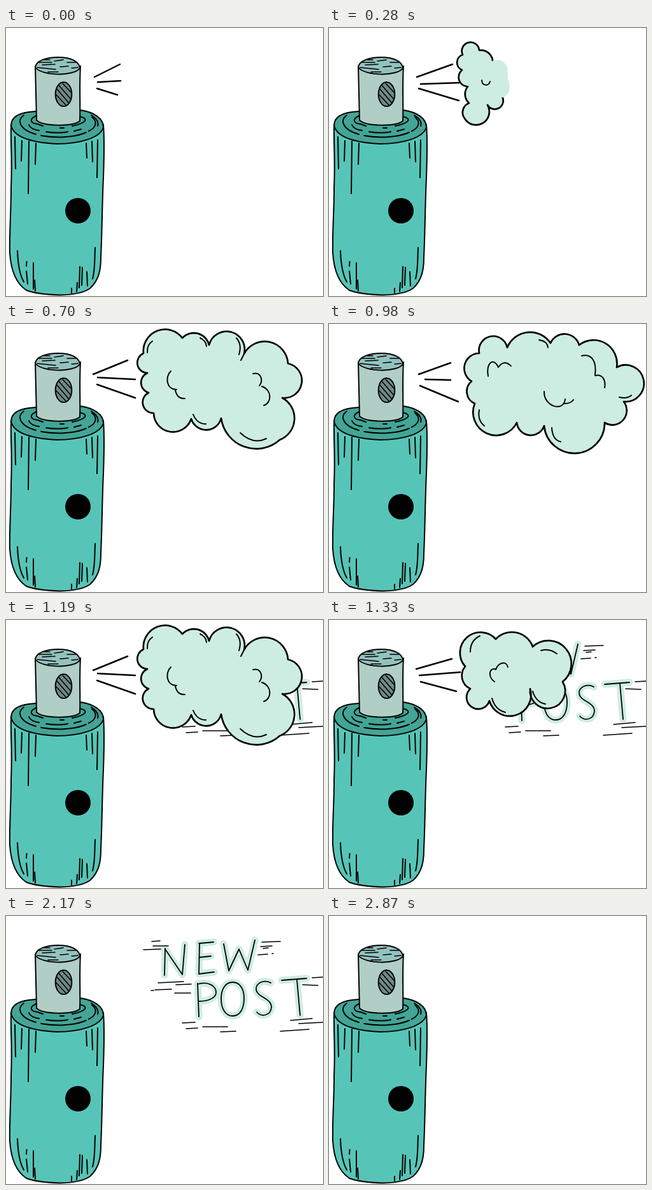
Animation, 498 px wide and 421 px high, one loop 3150 ms. Source, as an HTML page:

```html
<!DOCTYPE html>
<html lang="en">
<head>
<meta charset="utf-8">
<title>New post</title>
<style>
html, body { margin: 0; width: 100%; height: 100%; overflow: hidden; background: #fff; }
svg { display: block; width: 498px; height: 421px; }
path, ellipse { fill: none; stroke: #000; stroke-width: 2; stroke-linecap: round; stroke-linejoin: round; }
#lines path { stroke-width: 2.5; }
#text .glow { stroke: #cdece2; stroke-width: 11; }
#text .ink { stroke-width: 1.8; }
#text .dash { stroke-width: 1.7; }
#clouds .edge { fill: #cdece2; stroke-width: 2.7; }
#clouds .soft { fill: #cdece2; stroke: none; }
</style>
</head>
<body>
<svg viewBox="0 0 498 421" role="img" aria-label="Spray bottle: new post">
  <g id="bottle">
    <path fill="#56c5b7" style="fill:#56c5b7" d="M8 152C7 178 10 205 8 250C8 290 5 325 6 354C8 384 17 402 32 412C48 418 66 419 85 419.500C106 419 122 416 132 409C146 396 149 380 149 360C151 320 151 275 153 235C154 205 155 178 153 152Z"/>
    <path style="fill:#43a596" d="M8 153C8 138 24 132 47 131L117 129C138 132 153 142 153 156C148 173 115 182 80 182C42 180 12 172 8 153Z"/>
    <path d="M28 137C15 146 24 161 47 167M55 169C82 174 110 171 126 164M130 162C142 156 144 147 135 140M47 138C36 143 38 150 50 151L58 154M116 139C128 142 128 147 112 152L104 154M36 152C38 157 44 160 52 161M63 163C73 165 88 165 97 163M107 162L118 159M85 157H91M134 137C142 142 146 148 144 154"/>
    <path style="fill:#b0cec5" d="M46 60L48 145C60 155 105 155 116 146C117 120 115 90 117 60Z"/>
    <path style="fill:#94c2bf" d="M46 62C47 51 64 46 82 46C101 46 115 52 116 63C108 76 57 76 46 62Z"/>
    <path style="stroke-width:1.600" d="M51 54H72M60 50H69M76 52L90 50M96 54L110 54M49 62L78 65M85 61L98 60M57 58L77 57M103 63L113 62M66 69L82 69"/>
    <ellipse style="fill:#6e8a85" cx="90.500" cy="104" rx="12.800" ry="19"/>
    <path style="stroke-width:1.600" d="M83 90L102 112M80 96L99 118M79 105L95 122M89 87L102 101"/>
    <path d="M14 171L15 221M25 177L24 209M36 178L35 260M47 181L46 214M144 176L143 235M135 178L136 210M126 181L127 204M18 350Q19 383 28 399M32.500 367L32 374M43 369L43 410M32 382L34 402M140 345C139 365 140 380 136 394M116 375L115 408M120 376L119 404M127 383L128 405M112 400L111 414M103 409L103 416M45 396L46 413"/>
    <circle cx="113" cy="287" r="20" fill="#000"/>
  </g>
  <g id="text">
    <path class="glow"/><path class="ink"/>
    <path class="dash" d="M229 40L242 39M231 47L255 47M216 53L243 52M239 105L279 103M267 108L291 107M228 117L232 117M234 116L260 115M265 121L290 121M402 41L431 40M400 48L418 47M404 51L412 50M396 61L411 60M418 59L420 59M481 97L498 96M466 108L490 109M277 168L297 167M283 177L301 176M309 174L348 174M337 182L361 181M447 164L481 161M460 169L498 167M431 181L476 178"/>
  </g>
  <g id="lines"><path/></g>
  <g id="clouds"></g>
</svg>
<script>
const $ = q => document.querySelector(q);

const letters = 'M250 51L249 93M250 52L277 92L281 45' +
  'M304 43L303 91L327 88M303 43L326 41M304 65L322 63' +
  'M342 44L350 86L366 52L380 85L391 38' +
  'M301 106L303 158M301 107C318 102 330 110 330 120C330 130 315 134 303 134' +
  'M356 104C344 104 338 116 338 130C338 146 345 157 356 157C368 157 374 145 374 129C374 114 367 104 356 104Z' +
  'M416 105C404 99 392 106 393 116C395 128 417 129 417 143C416 157 401 159 394 151' +
  'M433 101L472 98M457 100L462 156';
$('.glow').setAttribute('d', letters);
$('.ink').setAttribute('d', letters);

// Each cloud: corners [x, y, bulge of the arc leading here], inner strokes, soft patches.
const clouds = {
  tiny: { edge: [[212,66],[214,46,.4],[230,50,.5],[231,118,.04],[214,122,.6],[217,96,.35],[212,66,.3]] },
  small: {
    edge: [[209,66],[210,42,.35],[236,35,.6],[257,56,.25],[273,110,0],[249,121,.45],
      [213,142,.5],[220,118,.25],[218,92,.2],[209,66,.35]],
    soft: 'M256 52C270 46 285 56 280 77C287 92 284 106 273 109L252 110L250 60Z',
    ink: 'M240 82C240 91 251 92 253 84'
  },
  mid: {
    edge: [[210,66],[222,38,.4],[268,32,.5],[318,50,.35],[322,100,.5],[280,128,.45],
      [232,130,.5],[216,100,.4],[210,66,.35]],
    ink: 'M250 92C242 80 250 70 260 78C266 66 276 68 278 74M224 50Q226 36 240 30M322 62Q335 66 334 78M286 122Q298 130 308 120'
  },
  wide: {
    edge: [[214,73],[262,30,.5],[320,42,.28],[367,97,.52],[316,108,.7],[252,127,.5],[222,108,.65],[214,73,.25]],
    ink: 'M260 97C251 91 249 75 262 77M262 78C266 66 279 64 281 74M222 50Q222 32 237 25M333 48Q346 44 358 53M256 123Q261 141 277 145M320 112Q325 129 340 132'
  },
  big: {
    edge: [[216,46],[277,22,.38],[319,33,.3],[374,47,.5],[443,62,.38],[434,116,.48],[430,182,.32],
      [338,148,.3],[291,149,.38],[232,140,.42],[224,108,.4],[222,77,.35],[216,46,.4]],
    ink: 'M259 74C250 82 251 103 268 103M266 104Q269 118 281 117M388 78C400 75 405 88 398 97M402 98C418 103 418 124 405 128M230 27Q221 33 222 45M305 22Q314 26 315 35M362 22Q371 32 366 48M374 47L369 57M368 171Q388 190 409 180M294 142Q300 157 314 157'
  },
  tall: {
    edge: [[222,90],[228,46,.4],[276,28,.5],[340,26,.35],[396,34,.4],[450,60,.38],[450,120,.5],
      [420,150,.4],[335,152,.5],[290,152,.35],[230,135,.45],[222,90,.3]],
    ink: 'M256 82C248 68 262 54 270 68Q280 56 288 66M336 104C336 126 358 130 368 116M396 52C412 48 420 62 414 78M414 79Q430 80 428 98M236 128Q236 144 248 150M346 156Q350 174 364 178'
  },
  full: {
    edge: [[224,90],[236,46,.38],[280,37,.5],[348,30,.3],[393,33,.35],[452,68,.34],[463,122,.68],
      [433,155,.42],[338,160,.48],[295,155,.4],[229,125,.48],[224,90,.28]],
    ink: 'M250 82C246 62 258 51 266 68Q275 55 286 66M338 106C337 130 369 139 371 118M370 125Q380 125 384 119M397 50C412 46 421 58 418 80M418 81C431 78 435 90 433 100M236 135Q233 151 244 160M350 163Q351 182 364 185M330 25Q343 27 344 37M456 115Q468 118 475 112'
  }
};

function outline(pts) {
  return pts.map(([x, y, b], i) => {
    if (!i) return `M${x} ${y}`;
    if (!b) return `L${x} ${y}`;
    const c = Math.hypot(x - pts[i - 1][0], y - pts[i - 1][1]);
    const r = c * (.25 + b * b) / (2 * b);
    return `A${r} ${r} 0 ${b > .5 ? 1 : 0} 1 ${x} ${y}`;
  }).join('') + 'Z';
}

const part = (cls, d) => d ? `<path class="${cls}" d="${d}"/>` : '';
$('#clouds').innerHTML = Object.entries(clouds).map(([id, c]) =>
  `<g id="${id}">${part('edge', outline(c.edge))}${part('soft', c.soft)}${part('ink', c.ink)}</g>`).join('');

const jets = {
  none: '',
  dot: 'M138 76L152 70M144 85L153 84M143 95L153 99',
  short: 'M138 77L166 63M144 85L167 84M143 95L166 102',
  base: 'M139 77L179 57M144 85L180 83M143 95L175 105',
  long: 'M138 77L194 57M144 88L204 86M141 95L204 114',
  flat: 'M137 77L193 61M142 87L206 82M144 97L200 112',
  big: 'M137 79L191 57M144 84L203 87M143 95L203 116',
  wide: 'M141 79L191 61M151 87L191 88M143 97L203 122'
};

// start time, cloud, jet, lettering shown
const steps = [
  [0, '', 'base', 0], [140, 'tiny', 'long', 0], [280, 'small', 'long', 0],
  [420, 'mid', 'long', 0], [560, 'wide', 'flat', 0], [700, 'big', 'big', 0],
  [840, 'tall', 'big', 0], [980, 'full', 'wide', 0], [1120, 'full', 'wide', 1],
  [1190, 'big', 'big', 1], [1330, 'wide', 'flat', 1], [1470, 'small', 'long', 1],
  [1610, 'tiny', 'long', 1], [1750, '', 'base', 1], [1890, '', 'short', 1],
  [2030, '', 'dot', 1], [2170, '', 'none', 1], [2870, '', 'none', 0]
];
const LOOP = 3150;
const show = (el, on) => el.style.display = on ? '' : 'none';
const groups = [...$('#clouds').children];
const start = performance.now();
let last;

function draw(now) {
  const t = Math.max(0, now - start) % LOOP;
  const step = steps.findLast(s => s[0] <= t);
  if (step !== last) {
    last = step;
    const [, cloud, jet, text] = step;
    groups.forEach(g => show(g, g.id === cloud));
    show($('#text'), text);
    $('#lines path').setAttribute('d', jets[jet]);
  }
  requestAnimationFrame(draw);
}
draw(start);
</script>
</body>
</html>
```
